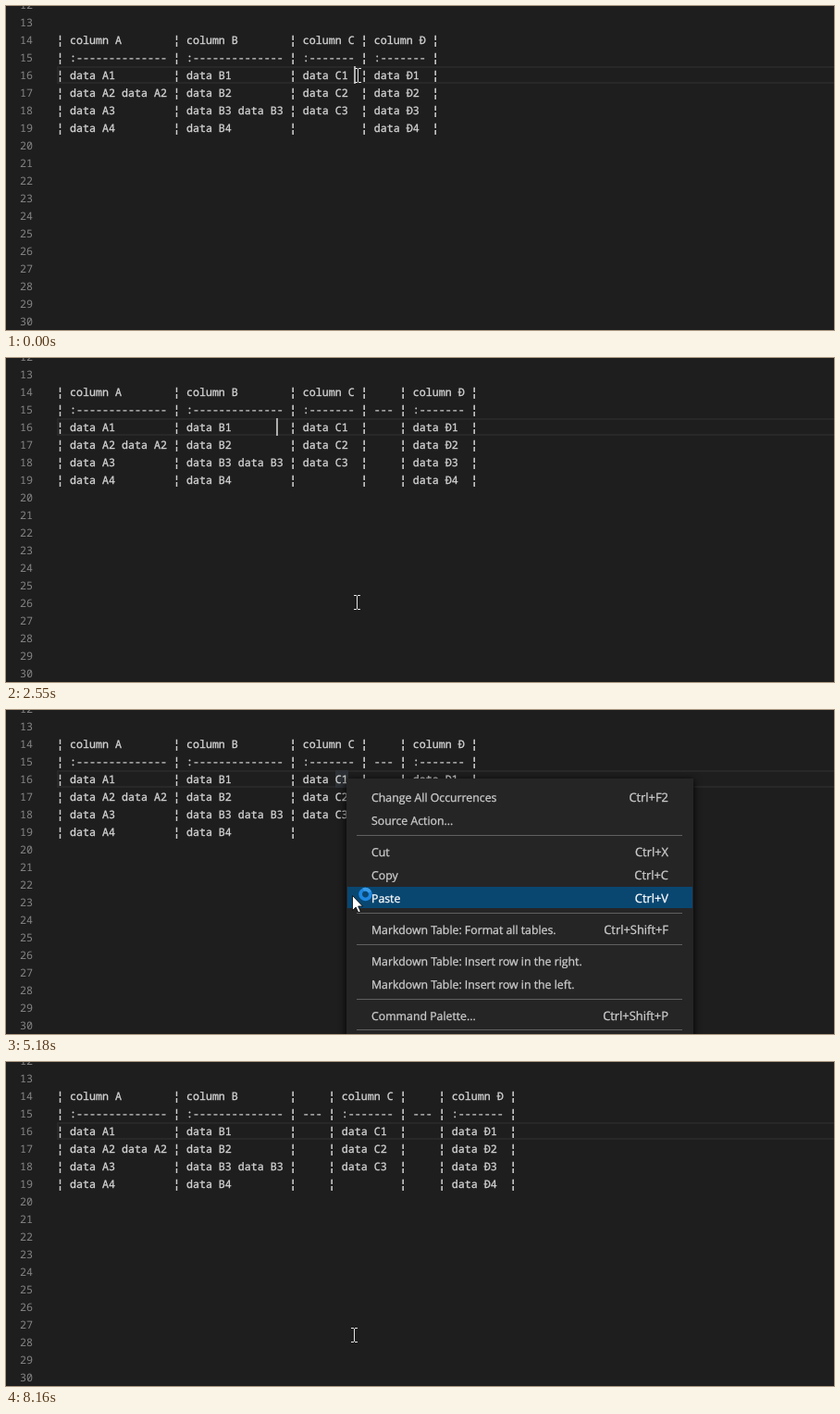
These frames come from a looping animation (895x350 px, 8240 ms). An HTML page:

```html
<!DOCTYPE html>
<html lang="en">
<head>
<meta charset="utf-8">
<title>Markdown table editing</title>
<style>
  html, body { margin: 0; width: 100%; height: 100%; overflow: hidden; background: #1e1e1e; }
  svg { display: block; }
  text { white-space: pre; text-rendering: geometricPrecision; stroke-width: .3; }
  .code { font: 11.667px "Noto Sans Mono", monospace; fill: #d4d4d4; stroke: #d4d4d4; }
  .number { fill: #858585; stroke: none; }
  .bar { stroke-width: .6; }
  .menu text { font: 12.3px "Open Sans", sans-serif; fill: #ccc; stroke: #ccc; }
  .menu .key { font-size: 12.9px; text-anchor: end; }
  .menu .hover text { fill: #fff; stroke: #fff; }
  .menu .hover rect { fill: #094771; }
  .panel { fill: #252526; filter: drop-shadow(0 2px 4px #000); }
</style>
</head>
<body>
<svg id="stage" width="895" height="350" viewBox="0 0 895 350"></svg>
<script>
const LOOP = 8240, LEFT = 55, CHAR = 7, LINE = 19;
const stage = document.getElementById('stage');

function add(parent, tag, attrs = {}, text) {
  const node = document.createElementNS('http://www.w3.org/2000/svg', tag);
  for (const name in attrs) node.setAttribute(name, attrs[name]);
  if (text !== undefined) node.textContent = text;
  parent.append(node);
  return node;
}
const group = (parent, attrs) => add(parent, 'g', attrs);
const show = (node, on) => node.setAttribute('visibility', on ? 'inherit' : 'hidden');
const place = (node, x, y) => node.setAttribute('transform', `translate(${x} ${y})`);
const baseline = n => 41 + LINE * (n - 14);

// Editor
add(stage, 'rect', { width: 895, height: 350, fill: '#1e1e1e' });
add(stage, 'rect', { x: 56, y: 66, width: 850, height: 17, fill: 'none', stroke: '#282828', 'stroke-width': 2 });
const wordMark = add(stage, 'rect', { x: 356, y: 65, width: 14, height: LINE, fill: '#2d3135' });
for (let n = 12; n <= 30; n++) {
  add(stage, 'text', { x: 15, y: baseline(n), class: 'code number' }, n);
}

// Tables: one letter per column, a space for an inserted column
function cellsOf(name) {
  if (name === ' ') return ['', '---', '', '', '', ''];
  const width = name < 'C' ? 15 : 8;
  const cells = ['column ' + name, ':'.padEnd(width, '-')];
  for (let i = 1; i <= 4; i++) cells.push(`data ${name}${i}`);
  if (name === 'A') cells[3] += ' data A2';
  if (name === 'B') cells[4] += ' data B3';
  if (name === 'C') cells[5] = '';
  return cells.map(cell => cell.padEnd(width));
}
function makeTable(names) {
  const table = group(stage);
  const columns = [...names].map(cellsOf);
  for (let row = 0; row < 6; row++) {
    const line = add(table, 'text', { x: LEFT, y: baseline(14 + row), class: 'code' });
    for (let i = 0; i <= columns.length; i++) {
      add(line, 'tspan', { class: 'bar' }, '¦');
      if (i < columns.length) add(line, 'tspan', {}, ` ${columns[i][row].padEnd(3)} `);
    }
  }
  return table;
}
const tables = ['ABCĐ', 'ABC Đ', 'AB C Đ'].map(makeTable);
const caret = add(stage, 'rect', { y: 65, width: 2, height: LINE, fill: '#aeafad' });

// Context menu
const menu = group(stage, { class: 'menu' });
add(menu, 'rect', { class: 'panel', width: 375, height: 400 });
for (const y of [61, 145, 179, 238, 271]) {
  add(menu, 'rect', { x: 11, y, width: 352, height: 1, fill: '#606060' });
}
const items = [
  [20, 'Change All Occurrences', 'Ctrl+F2'],
  [45, 'Source Action...'],
  [79, 'Cut', 'Ctrl+X'],
  [104, 'Copy', 'Ctrl+C'],
  [129, 'Paste', 'Ctrl+V'],
  [163, 'Markdown Table: Format all tables.', 'Ctrl+Shift+F'],
  [197, 'Markdown Table: Insert row in the right.'],
  [222, 'Markdown Table: Insert row in the left.'],
  [256, 'Command Palette...', 'Ctrl+Shift+P']
].map(([y, label, key = '']) => {
  const node = group(menu);
  add(node, 'rect', { x: 1, y: y - 12, width: 373, height: 23, fill: 'none' });
  add(node, 'text', { x: 27, y: y + 4.5 }, label);
  add(node, 'text', { x: 348, y: y + 4.5, class: 'key' }, key);
  return { y, node };
});

// Mouse pointers
const pointer = group(stage);
function makeRing(parent, x, y, radius, width) {
  const ring = group(group(parent, { transform: `translate(${x} ${y})` }), { fill: 'none', 'stroke-width': width });
  add(ring, 'circle', { r: radius, stroke: '#1d87e0' });
  add(ring, 'path', { d: `M${-radius} 0A${radius} ${radius} 0 0 1 0 ${-radius}`, stroke: '#3a9cea' });
  return ring;
}
const makeArrow = parent => add(parent, 'path', {
  d: 'M.5.5V16.5L4.2 13 6.8 18.8 9.3 17.7 6.7 12H11.5Z', fill: '#fff', stroke: '#000', 'stroke-width': .8
});
const shapes = { beam: group(pointer), arrow: group(pointer), working: group(pointer), busy: group(pointer) };
add(shapes.beam, 'path', {
  d: 'M-3-7.5H0M1-7.5H4M.5-7V7M-3 7.5H0M1 7.5H4', fill: 'none', stroke: '#e4e4e4'
});
makeArrow(shapes.arrow);
makeArrow(shapes.working);
const rings = [makeRing(shapes.working, 14.5, -1, 5.4, 3.8), makeRing(shapes.busy, 0, 0, 9.5, 5)];

// [time, x, y, shape]: a key that names a shape is a jump, the others are moved to
const path = [
  [0, 380, 75, 'beam'], [100, 380, 75], [150, 380, 71],
  [330, 376, 71, 'busy'], [510, 376, 71, 'arrow'],
  [840, 376, 71], [900, 373, 82], [1400, 371, 227], [1630, 379, 264],
  [2450, 379, 264, 'beam'], [3060, 379, 264], [3210, 379, 261], [3850, 371, 85], [4030, 370, 77],
  [4130, 368, 74, 'busy'], [4780, 368, 74, 'working'],
  [4870, 370, 97], [4940, 371, 108], [5180, 374, 200], [5610, 374, 287], [5790, 374, 293],
  [5840, 375, 295, 'busy'], [6680, 376, 295, 'beam']
];
function pointerAt(time) {
  let i = path.length - 1;
  while (path[i][0] > time) i--;
  const [start, x, y] = path[i], next = path[i + 1];
  const shape = path.slice(0, i + 1).reverse().find(key => key[3])[3];
  if (!next || next[3]) return { x, y, shape };
  const k = (time - start) / (next[0] - start);
  return { x: x + (next[1] - x) * k, y: y + (next[2] - y) * k, shape };
}

// [from, to, column]
const caretTimes = [
  [0, 100, 46], [2450, 2550, 46], [2550, 3060, 34], [3560, 4060, 34],
  [6680, 7170, 33], [7630, 8160, 33]
];
// [from, to, x, y]
const menuTimes = [[330, 2450, 376, 71], [4130, 6680, 368, 74]];
const current = (spans, time) => spans.find(([from, to]) => time >= from && time < to);

function render(time) {
  const version = time < 2550 ? 0 : time < 6680 ? 1 : 2;
  tables.forEach((table, i) => show(table, i === version));
  show(wordMark, time >= 4130 && time < 6680);

  const blink = current(caretTimes, time);
  show(caret, blink);
  if (blink) caret.setAttribute('x', LEFT + CHAR * blink[2] - 1);

  const mouse = pointerAt(time);
  const x = Math.round(mouse.x), y = Math.round(mouse.y);
  place(pointer, x, y);
  for (const name in shapes) show(shapes[name], name === mouse.shape);
  rings.forEach(ring => ring.setAttribute('transform', `rotate(${time * .36})`));

  const open = current(menuTimes, time);
  show(menu, open);
  if (!open) return;
  const [, , left, top] = open;
  place(menu, left, top);
  for (const item of items) {
    const offset = y - top - item.y;
    const hover = x >= left && offset >= -12 && offset < 12;
    item.node.setAttribute('class', hover ? 'hover' : '');
  }
}

const begin = performance.now();
function tick() {
  render((performance.now() - begin) % LOOP);
  requestAnimationFrame(tick);
}
tick();
</script>
</body>
</html>
```
